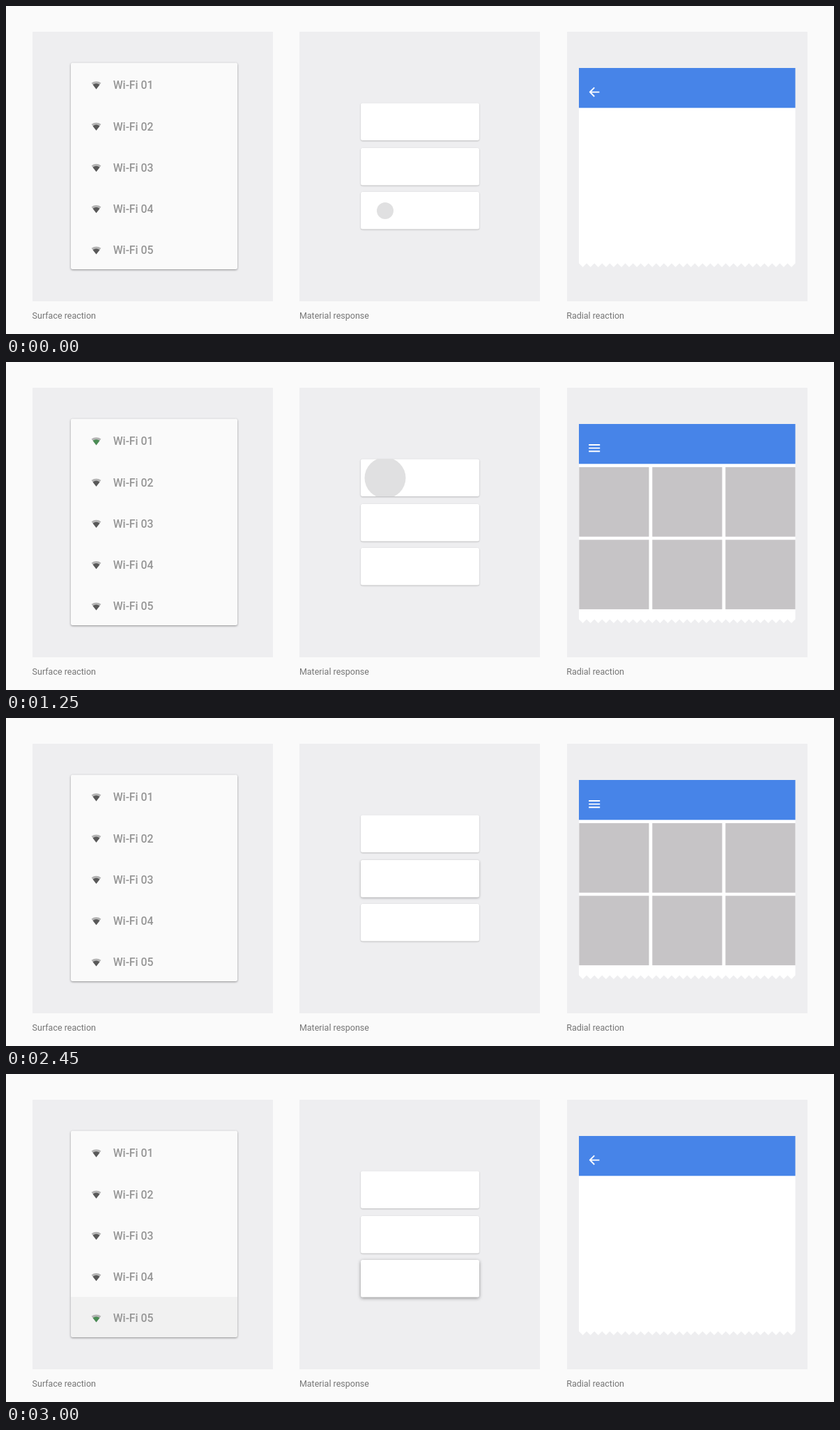
Recreate the animation shown at these times as an HTML page with a canvas. Size 1188x471 px, loop 3.05 s.

```html
<!DOCTYPE html>
<html lang="en">
<head>
<meta charset="utf-8">
<title>Touch reactions</title>
<style>
  html, body { margin: 0; width: 100%; height: 100%; overflow: hidden; background: #fafafa; }
  canvas { display: block; }
</style>
</head>
<body>
<canvas id="stage" width="1188" height="471"></canvas>
<script>
const ctx = document.getElementById('stage').getContext('2d');
const LOOP = 3050, STEP = 50;
const FONT = 'Roboto, sans-serif';

const clamp = v => Math.max(0, Math.min(1, v));
const ramp = (t, start, length) => clamp((t - start) / length);
const mix = (a, b, p) => a + (b - a) * p;

// Standard curve: cubic-bezier(.4, 0, .2, 1)
function ease(x) {
  let lo = 0, hi = 1;
  for (let i = 0; i < 20; i++) {
    const s = (lo + hi) / 2, r = 1 - s;
    if (1.2 * r * r * s + 0.6 * r * s * s + s * s * s < x) lo = s; else hi = s;
  }
  return lo * lo * (3 - 2 * lo);
}

function rect(x, y, w, h, color) {
  ctx.fillStyle = color;
  ctx.fillRect(x, y, w, h);
}

function disc(x, y, r, color) {
  ctx.fillStyle = color;
  ctx.beginPath();
  ctx.arc(x, y, r, 0, 2 * Math.PI);
  ctx.fill();
}

function roundPath(x, y, w, h, r) {
  ctx.beginPath();
  ctx.roundRect(x, y, w, h, r);
}

function text(str, x, y, font, color) {
  ctx.font = font + ' ' + FONT;
  ctx.fillStyle = color;
  ctx.fillText(str, x, y);
}

function paper(x, y, w, h, color, alpha, blur, drop) {
  ctx.save();
  ctx.shadowColor = `rgba(0,0,0,${alpha})`;
  ctx.shadowBlur = blur;
  ctx.shadowOffsetY = drop;
  ctx.fillStyle = color;
  roundPath(x, y, w, h, 2.5);
  ctx.fill();
  ctx.restore();
}

// ---- Surface reaction: list with row ripples ----
const LIST = { x: 93, y: 81.5, w: 239, h: 296.5 };
const ROW = 59.3;
const rowTouches = [
  { row: 0, start: 629, x: 111, y: 113 },
  { row: 2, start: 1686, x: 212, y: 230 },
  { row: 4, start: 2487, x: 300, y: 372 }
];

function rowRipple(touch, t) {
  const age = t - touch.start;
  const fade = 1 - ramp(age, 300, 333);
  if (age < 0 || !fade) return;
  const top = touch.row === 0 ? LIST.y : Math.round(82.3 + touch.row * ROW);
  ctx.save();
  roundPath(LIST.x, LIST.y, LIST.w, LIST.h, 2.5);
  ctx.clip();
  ctx.beginPath();
  ctx.rect(LIST.x, top, LIST.w, 60);
  ctx.clip();
  rect(LIST.x, top, LIST.w, 60, `rgba(0,0,10,${0.046 * fade * ramp(age, 0, 100)})`);
  disc(touch.x, touch.y, 20 + 0.7 * age, `rgba(0,0,0,${0.05 * fade})`);
  ctx.restore();
}

function greenness(row, t) {
  const touch = rowTouches.find(r => r.row === row);
  if (!touch) return 0;
  const off = touch.start < 2150 ? ramp(t, 2100, 100) : 0;
  return ramp(t, touch.start, 150) * (1 - off);
}

function fan(x, y, r, color) {
  const half = 0.66;
  ctx.fillStyle = color;
  ctx.beginPath();
  ctx.moveTo(x, y);
  ctx.arc(x, y, r, -Math.PI / 2 - half, -Math.PI / 2 + half);
  ctx.fill();
}

function list(t) {
  paper(LIST.x, LIST.y, LIST.w, LIST.h, '#fafafa', 0.4, 3, 1);
  rowTouches.forEach(touch => rowRipple(touch, t));
  for (let i = 0; i < 5; i++) {
    const y = 113.5 + i * ROW, g = greenness(i, t);
    fan(129.5, y + 5.9, 11.2, '#b4b4b4');
    fan(129.5, y + 5.9, 8, `rgb(${mix(88, 74, g)},${mix(88, 140, g)},${mix(88, 84, g)})`);
    text('Wi-Fi 0' + (i + 1), 153.7, y + 5.7, '500 15.8px', '#959595');
  }
}

// ---- Material response: cards that lift ----
const cardTops = [139.5, 204, 267];
const cardTouches = [
  { card: 2, start: 0 },
  { card: 0, start: 1180 },
  { card: 1, start: 1850 },
  { card: 2, start: 2470 }
];

function card(index, t) {
  const x = 509, y = cardTops[index], w = 170, h = 53.5;
  const touch = cardTouches.filter(c => c.card === index && c.start <= t).pop();
  const age = touch ? t - touch.start : LOOP;
  const lift = ramp(age, 60, 170) * (1 - ramp(age, 510, 140));
  paper(x, y, w, h, '#fff', 0.26 + 0.16 * lift, 2 + 3.5 * lift, 0.8 + 0.9 * lift);
  if (age > 290) return;
  ctx.save();
  roundPath(x, y, w, h, 2.5);
  ctx.clip();
  disc(544, y + 27, 12 + 0.25 * age, `rgba(0,0,8,${0.12 * (1 - ramp(age, 165, 110))})`);
  ctx.restore();
}

// ---- Radial reaction: grid and menu/back icon ----
const OPEN = 75, CLOSE = 2475;

function sheet() {
  const left = 822, right = 1132.5, teeth = 28, pitch = (right - left) / teeth;
  ctx.fillStyle = '#fff';
  ctx.beginPath();
  ctx.moveTo(left, 146);
  ctx.lineTo(left, 369.5);
  for (let i = 0; i < teeth; i++) {
    ctx.lineTo(left + (i + 0.5) * pitch, 375);
    ctx.lineTo(left + (i + 1) * pitch, 369.5);
  }
  ctx.lineTo(right, 146);
  ctx.fill();
}

function grid(t) {
  for (let r = 0; r < 2; r++) {
    for (let c = 0; c < 3; c++) {
      const wait = (r + c) * 50;
      const alpha = ramp(t, OPEN + wait, 250) - ramp(t, CLOSE + wait, 250);
      rect(822.3 + c * 105, 151 + r * 104.3, 100.2, 99.8, `rgba(198,196,198,${alpha})`);
    }
  }
}

function icon(t) {
  const p = t < 1500 ? 1 - ease(ramp(t, 125, 400)) : ease(ramp(t, 2495, 420));
  ctx.save();
  ctx.translate(844.2, 123.6);
  for (const start of [OPEN, CLOSE]) {
    const alpha = 0.18 * ramp(t, start, 80) * (1 - ramp(t, start + 200, 200));
    if (alpha > 0) disc(0, 0, 14.6 * ease(ramp(t, start - 20, 170)), `rgba(255,255,255,${alpha})`);
  }
  ctx.rotate(-Math.PI * (1 - p));
  ctx.strokeStyle = '#fff';
  ctx.lineWidth = 1.9;
  ctx.beginPath();
  ctx.moveTo(mix(-8, -6, p), 0);
  ctx.lineTo(mix(8, 7.2, p), 0);
  for (const side of [-1, 1]) {
    ctx.moveTo(mix(-8, -6.8, p), side * mix(4.6, -0.4, p));
    ctx.lineTo(mix(8, 0, p), side * mix(4.6, 6.4, p));
  }
  ctx.stroke();
  ctx.restore();
}

function draw(t) {
  rect(0, 0, 1188, 471, '#fafafa');
  ['Surface reaction', 'Material response', 'Radial reaction'].forEach((label, i) => {
    const x = 38 + i * 383.3;
    rect(Math.round(x), 37, 345, 387, '#eeeef0');
    text(label, x - 0.4, 449, '400 12.5px', '#757575');
  });
  list(t);
  for (let i = 0; i < 3; i++) card(i, t);
  sheet();
  grid(t);
  rect(822, 89, 310.5, 57.3, '#4784e8');
  icon(t);
}

const begin = performance.now();
function tick() {
  const t = (performance.now() - begin) % LOOP;
  draw(Math.floor(t / STEP) * STEP);
  requestAnimationFrame(tick);
}
tick();
</script>
</body>
</html>
```
